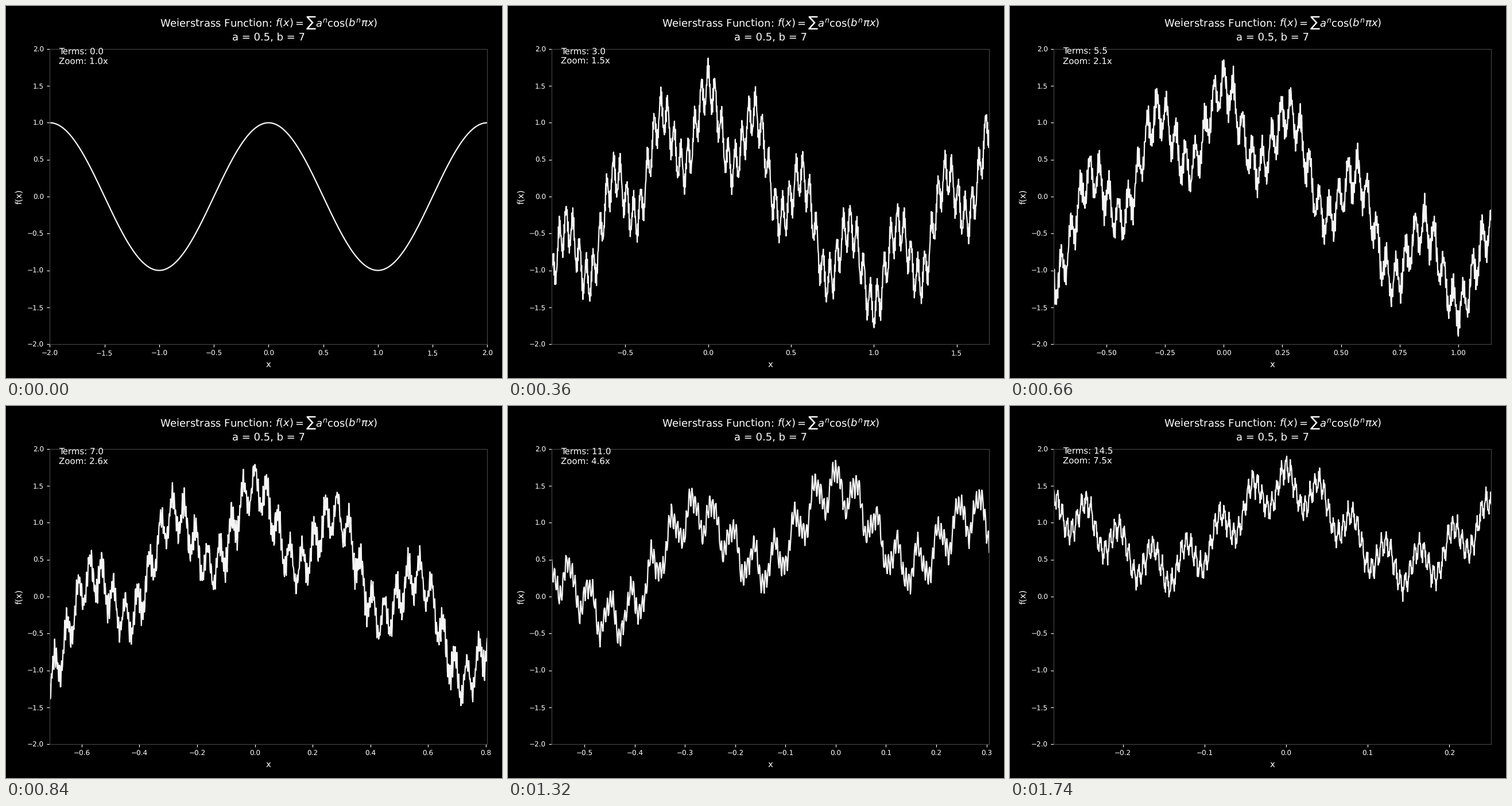
A matplotlib script that plays this animation: 864 px wide and 648 px high, repeating every 1.8 s.

```python
import numpy as np
import matplotlib.pyplot as plt
from matplotlib.animation import FuncAnimation

A, B = 0.5, 7
FRAMES, INTERVAL = 30, 60
MAX_TERMS = 15
SAMPLES = 1000

plt.style.use("dark_background")
plt.rcParams["text.hinting"] = "none"


def term(x, n):
    return A**n * np.cos(B**n * np.pi * x)


def weierstrass(x, terms):
    """Partial sum; the newest term fades in with the fractional part."""
    whole = int(terms)
    y = sum(term(x, n) for n in range(whole + 1))
    return y + (terms - whole) * term(x, whole + 1)


fig, ax = plt.subplots(figsize=(8, 6), dpi=108)
fig.set_facecolor("black")
ax.set_facecolor("black")

line, = ax.plot([], [], color="whitesmoke", lw=1.5)
info = ax.text(0.02, 0.95, "", transform=ax.transAxes, color="white", fontsize=10)

ax.set_title(
    r"Weierstrass Function: $f(x) = \sum a^n \cos(b^n \pi x)$"
    f"\na = {A}, b = {B}",
    color="white", fontsize=12, pad=10,
)
ax.set_xlabel("x", color="white", fontsize=10)
ax.set_ylabel("f(x)", color="white", fontsize=10)
ax.set_xlim(-2, 2)
ax.set_ylim(-2, 2)
ax.tick_params(colors="white", labelsize=8)
for spine in ax.spines.values():
    spine.set_color("#444444")
fig.tight_layout()


def update(frame):
    t = frame / FRAMES
    terms = MAX_TERMS * t
    zoom = 8**t
    center = 0.6 * np.sin(2 * np.pi * t) / zoom
    left, right = center - 2 / zoom, center + 2 / zoom

    x = np.linspace(left, right, SAMPLES)
    line.set_data(x, weierstrass(x, terms))
    ax.set_xlim(left, right)
    info.set_text(f"Terms: {terms:.1f}\nZoom: {zoom:.1f}x")
    return line, info


anim = FuncAnimation(fig, update, frames=FRAMES, interval=INTERVAL, repeat=True, repeat_delay=0)
plt.show()
```
